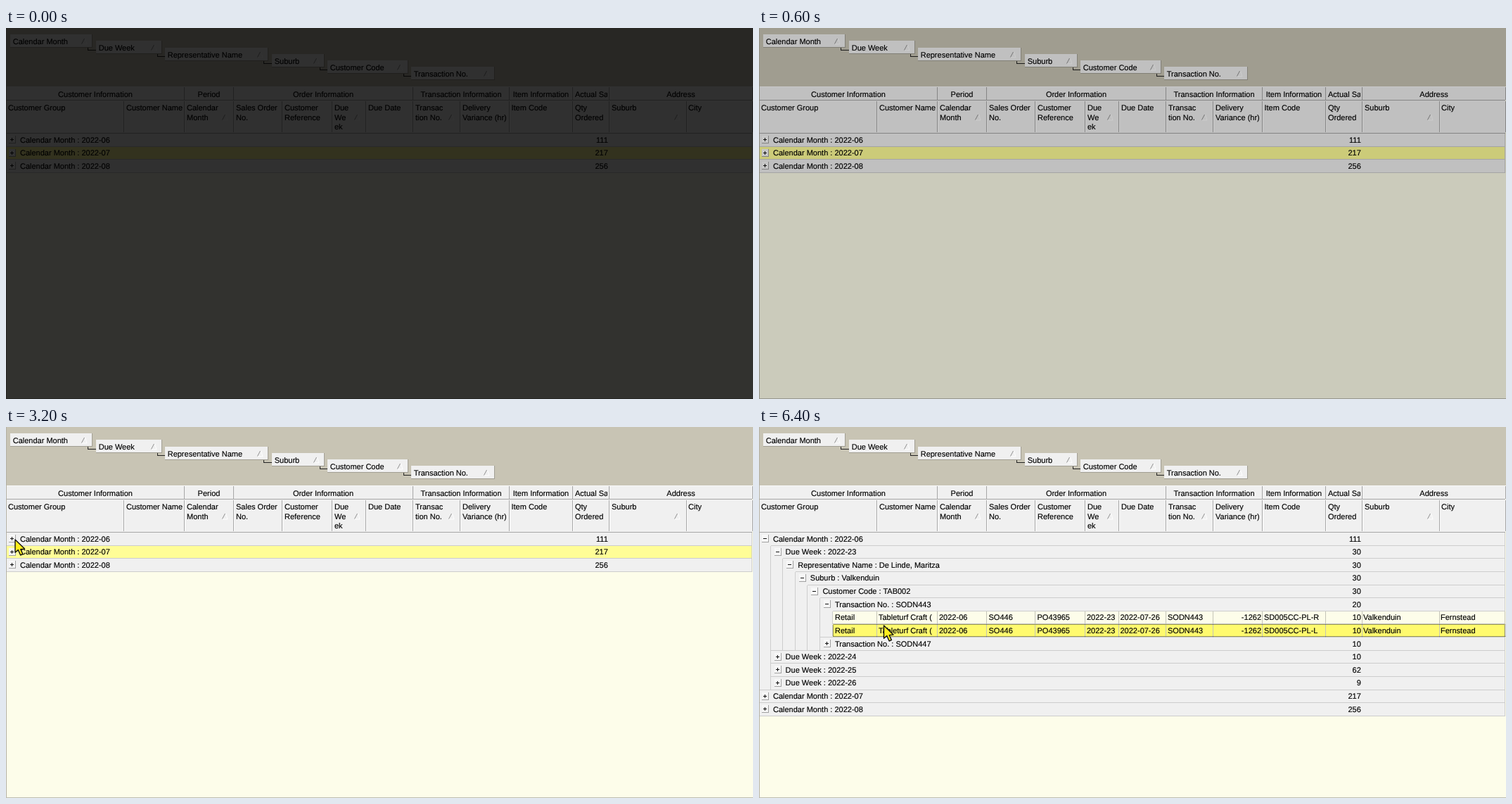
Animation, 1062 px wide and 527 px high, one loop 8 s. Source, as an HTML page:

```html
<!DOCTYPE html>
<html lang="en">
<head>
<meta charset="utf-8">
<title>Grouped order grid</title>
<style>
  html, body { margin: 0; width: 100%; height: 100%; overflow: hidden; background: #fdfdea; }
  svg { display: block; width: 1062px; height: 527px; }
  text { font: 11px "Liberation Sans", Arial, sans-serif; fill: #000; stroke: #000; stroke-width: .15; white-space: pre; text-rendering: geometricPrecision; }
  rect { shape-rendering: crispEdges; }
  .tip rect { shape-rendering: auto; }
  .tip text { font: 14.1px Lato, sans-serif; fill: #e8e6e0; stroke: none; }
</style>
</head>
<body>
<svg id="stage" viewBox="0 0 1062 527"></svg>
<script>
const LOOP = 8000, ROW_TOP = 150, PITCH = 18.63, INDENT = 17.6, RIGHT = 1061;
const FACE = '#f0f0f0', LINE = '#a6a6a6', SOFT = '#cdcdcd';
const stage = document.getElementById('stage');

function el(parent, tag, attrs, content) {
  const node = document.createElementNS('http://www.w3.org/2000/svg', tag);
  for (const key in attrs) node.setAttribute(key, attrs[key]);
  if (content !== undefined) node.textContent = content;
  parent.appendChild(node);
  return node;
}
const box = (g, x, y, width, height, fill) => el(g, 'rect', { x, y, width, height, fill });
const label = (g, x, mid, str, anchor = 'start') =>
  el(g, 'text', { x, y: mid + 4, 'text-anchor': anchor }, str);
const sortMark = (g, x, y) => {
  el(g, 'path', { d: `M${x - 2.5} ${y + 3.5}L${x + 1.5} ${y - 4}`, stroke: '#909090', fill: 'none' });
  el(g, 'path', { d: `M${x + 2.5} ${y - 4}L${x + 5} ${y + 4}H${x - 2}`, stroke: '#fff', fill: 'none' });
};
const show = (node, on) => { node.style.display = on ? '' : 'none'; };

function clip(id, x, y, width, height) {
  el(el(stage, 'clipPath', { id }), 'rect', { x, y, width, height });
  return `url(#${id})`;
}
const nameClip = clip('nameClip', 168, 140, 83, 300);
const qtyClip = clip('qtyClip', 806, 84, 49, 18);

// Group-by panel
box(stage, 0, 0, 1062, 527, '#fdfdea');
box(stage, 0, 0, 1062, 83, '#c8c4b4');
const chips = [
  ['Calendar Month', 6, 123], ['Due Week', 128, 222], ['Representative Name', 226, 373],
  ['Suburb', 378, 453], ['Customer Code', 457, 572], ['Transaction No.', 576, 695]
];
chips.forEach(([name, x, end], i) => {
  const y = Math.round(9 + i * 9.25);
  box(stage, x, y, end - x, 19, FACE);
  box(stage, x, y + 18, end - x, 1, '#a19e93');
  box(stage, end - 1, y, 1, 19, '#a19e93');
  label(stage, x + 3.7, y + 10, name);
  sortMark(stage, end - 13, y + 10);
  if (i < chips.length - 1) {
    box(stage, end - 7, y + 19, 1, 4, '#222');
    box(stage, end - 7, y + 22, 12, 1, '#222');
  }
});

// Column headers
box(stage, 0, 83, RIGHT, 67, FACE);
box(stage, 0, 83, RIGHT, 1, '#f8f8f8');
box(stage, 0, 102, RIGHT, 1, LINE);
box(stage, 0, 149, RIGHT, 1, LINE);
const bands = [
  ['Customer Information', 0, 253], ['Period', 253, 323], ['Order Information', 323, 578],
  ['Transaction Information', 578, 715], ['Item Information', 715, 805],
  ['Actual Sales', 805, 857], ['Address', 857, 1061]
];
for (const [name, from, to] of bands) {
  const cut = name === 'Actual Sales';
  const t = label(stage, cut ? 809 : (from + to) / 2 + 0.5, 93.5, name, cut ? 'start' : 'middle');
  if (cut) t.setAttribute('clip-path', qtyClip);
  box(stage, to, 84, 1, 18, LINE);
}
// [heading lines, text x, right edge, sort mark x]
const columns = [
  ['Customer Group', 3, 167], ['Customer Name', 171, 253], ['Calendar|Month', 257, 323, 310],
  ['Sales Order|No.', 327, 392], ['Customer|Reference', 396, 463], ['Due|We|ek', 467, 511, 498],
  ['Due Date', 515, 578], ['Transac|tion No.', 582, 645, 632], ['Delivery|Variance (hr)', 649, 715],
  ['Item Code', 718.5, 805], ['Qty|Ordered', 809, 857], ['Suburb', 861, 967, 953], ['City', 970, 1061]
];
for (const [heading, x, edge, mark] of columns) {
  heading.split('|').forEach((line, i) => label(stage, x, 113.3 + i * 13.5, line));
  box(stage, edge + 1, 104, 1, 44, '#fff');
  box(stage, edge, 104, 1, 44, LINE);
  if (mark) sortMark(stage, mark, 127);
}

// Rows: [level, sign, caption, quantity], or a list of cells for a detail row
const months = [
  [0, '+', 'Calendar Month : 2022-06', 111],
  [0, '+', 'Calendar Month : 2022-07', 217],
  [0, '+', 'Calendar Month : 2022-08', 256]
];
const detail = side => ['Retail', 'Tableturf Craft (', '2022-06', 'SO446', 'PO43965', '2022-23',
  '2022-07-26', 'SODN443', '-1262', 'SD005CC-PL-' + side, '10', 'Valkenduin', 'Fernstead'];
const cellX = [108, 170, 256, 326.5, 395.5, 466, 513.5, 581, 714, 718, 856, 859, 969];
const opened = [
  [0, '-', 'Calendar Month : 2022-06', 111],
  [1, '-', 'Due Week : 2022-23', 30],
  [2, '-', 'Representative Name : De Linde, Maritza', 30],
  [3, '-', 'Suburb : Valkenduin', 30],
  [4, '-', 'Customer Code : TAB002', 30],
  [5, '-', 'Transaction No. : SODN443', 20],
  [6, detail('R')],
  [6, detail('L')],
  [5, '+', 'Transaction No. : SODN447', 10],
  [1, '+', 'Due Week : 2022-24', 10],
  [1, '+', 'Due Week : 2022-25', 62],
  [1, '+', 'Due Week : 2022-26', 9],
  months[1], months[2]
];

function expander(g, x, mid, sign) {
  box(g, x - 5, mid - 5, 10, 10, '#f8f8f8');
  box(g, x - 5, mid + 5, 10, 1, '#a0a0a0');
  box(g, x + 4, mid - 5, 1, 10, '#a0a0a0');
  box(g, x - 3, mid, 5, 1, '#111');
  if (sign === '+') box(g, x - 1, mid - 2, 1, 5, '#111');
}

function grid(rows, selected, focused) {
  const g = el(stage, 'g', {});
  const left = level => level && Math.round(level * INDENT - 1);
  rows.forEach(([level, sign, caption, qty], i) => {
    const y = Math.round(ROW_TOP + i * PITCH), next = Math.round(ROW_TOP + (i + 1) * PITCH);
    const h = next - y, mid = 158.5 + i * PITCH, x = left(level), cells = Array.isArray(sign);
    const plain = cells ? (i % 2 ? '#f4f4f1' : '#fdfdea') : FACE;
    box(g, 0, y, RIGHT, h, FACE);
    box(g, x, y, RIGHT - x, h, i !== selected ? plain : focused ? '#fffa6e' : '#fffd97');
    for (let l = 1; l <= level; l++) box(g, left(l) - 1, y, 1, h, SOFT);
    const lineX = left(rows[i + 1] ? rows[i + 1][0] : 0);
    box(g, lineX, next - 1, RIGHT - lineX, 1, SOFT);
    box(g, RIGHT - 1, y, 1, h, SOFT);
    if (cells) {
      sign.forEach((value, c) => {
        const t = label(g, cellX[c], mid, value, c === 8 || c === 10 ? 'end' : 'start');
        if (c === 1) t.setAttribute('clip-path', nameClip);
        box(g, Math.min(columns[c][2], RIGHT - 1), y, 1, h, '#c4c4b8');
      });
    } else {
      expander(g, Math.round(9 + level * INDENT), Math.floor(mid), sign);
      label(g, 20 + level * INDENT, mid, caption);
      label(g, 855.8, mid, qty, 'end');
    }
    if (i === selected && focused) {
      el(g, 'rect', { x: x + 0.5, y: y + 0.5, width: RIGHT - x - 1, height: h - 2,
        fill: 'none', stroke: '#333', 'stroke-dasharray': '1 1' });
    }
  });
  return g;
}

// Each scene runs from its time to the next one
const scenes = [
  [0, grid(months, 1, false)],
  [3600, grid(opened, 12, true)],
  [6400, grid(opened, 7, true)]
];
box(stage, 0, 0, 1, 527, '#b4b2a6');
box(stage, 0, 526, 1062, 1, '#bdbdb0');

// Recorder hint, with the pointer just entering at the top
const hint = el(stage, 'g', { class: 'tip' });
el(hint, 'rect', { x: 434, y: -20, width: 196, height: 46, rx: 15, fill: '#7b7970' });
el(hint, 'text', { x: 531.5, y: 13.5, 'text-anchor': 'middle' }, 'Stop recording (Shift+F10)');
box(hint, 158, 0, 6, 1, '#111');
box(hint, 165, 0, 7, 1, '#111');

const pointer = el(stage, 'path', {
  d: 'M0 0V18.3L4.3 14.6L7.6 22L10.9 20.5L7.8 13.6L13.5 13.1Z',
  fill: '#ffee1c', stroke: '#111', 'stroke-width': 1.4, 'stroke-linejoin': 'round'
});
const path = [
  [2200, 110, 58], [2400, 59, 99], [2600, 30, 134], [2800, 15, 153], [3000, 13, 160],
  [4400, 13, 162], [4600, 28, 185], [4800, 71.5, 211.5], [5000, 109, 241],
  [5200, 145, 262], [5400, 168, 275], [5600, 177, 281], [6200, 177.5, 282]
];
const shade = box(stage, 0, 0, 1062, 527, '#000');

const latest = (table, t) => table.filter(step => step[0] <= t).pop();

function draw(t) {
  shade.setAttribute('opacity', Math.max(0, 0.8 - 0.2 * Math.floor(t / 200)));
  const scene = latest(scenes, t);
  for (const s of scenes) show(s[1], s === scene);
  show(hint, t >= 2000 && t < 2200);
  const at = latest(path, t);
  show(pointer, at);
  if (at) pointer.setAttribute('transform', `translate(${at[1]} ${at[2]})`);
}

const start = performance.now();
function tick(now) {
  draw(Math.max(0, now - start) % LOOP);
  requestAnimationFrame(tick);
}
draw(0);
requestAnimationFrame(tick);
</script>
</body>
</html>
```
